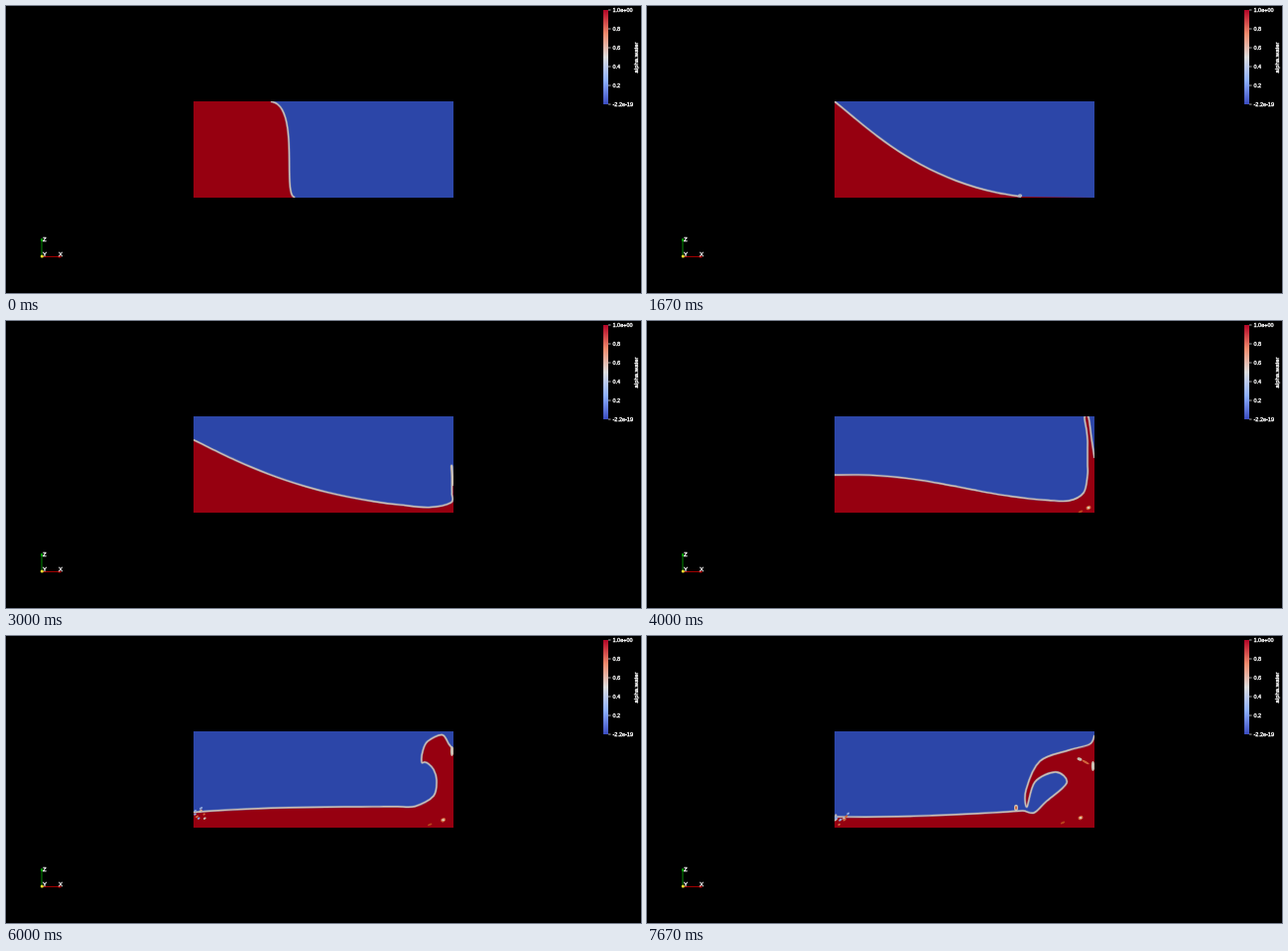
Recreate the animation shown at these times as an HTML page with a canvas. Size 640 by 289 pixels, loop 8000 ms.

```html
<!DOCTYPE html>
<html lang="en">
<head>
<meta charset="utf-8">
<title>Dam break, alpha.water</title>
<style>
html, body { margin: 0; width: 100%; height: 100%; overflow: hidden; background: #000; }
canvas { display: block; }
</style>
</head>
<body>
<canvas id="stage" width="640" height="289"></canvas>
<script>
const ctx = document.getElementById('stage').getContext('2d');
const LOOP = 8000;
const LEFT = 189, TOP = 96, RIGHT = 451, BOTTOM = 193;
const RED = '#960010', BLUE = '#2c46a8';
const PALE = '#cbbfb2', SKY = '#8fa9df', ORANGE = '#d0653c';

const parse = ([step, text]) => ({ step, points: text.split(' ').map(p => p.split(',').map(Number)) });

// One cubic Bezier for the main water surface, keyed by step
const floorKeys = [
  [0, '267,96 297,100 278,190 291,193'],
  [5, '189,96 225,125 280,180 377,192'],
  [7, '189,96 210,142 285,179 427,192'],
  [12, '189,155 290,152 340,181 425,181'],
  [16, '189,177 270,160 340,172 420,173'],
  [20, '189,178 270,182 340,173 405,170'],
  [23, '189,182 250,183 320,180 379,176']
].map(parse);

// Outline of the jet at the right wall, which curls into a breaker
const jetKeys = [
  [12, '440,173 444,155 444,145 444,135 444,128 444,120 443,110 441,97 445,97 448,118 451,138'],
  [16, '436,163 437,145 435,135 433,126 433,120 434,114 435,105 437,98 443,97 447,113 451,132'],
  [20, '426,159 431,145 427,134 418,131 411,134 404,140 405,127 413,114 436,102 446,105 451,97'],
  [23, '390,178 402,167 423,148 412,137 391,147 383,172 382,155 396,126 425,115 446,109 451,100']
].map(parse);

const mix = (a, b, u) => a + (b - a) * u;

function pose(keys, step) {
  const next = keys.findIndex(k => k.step > step);
  const i = next < 0 ? keys.length - 2 : Math.max(0, next - 1);
  const a = keys[i], b = keys[i + 1];
  let u = Math.max(0, (step - a.step) / (b.step - a.step));
  if (a.step === 0) u **= 1.25; // the column starts slowly
  return a.points.map((p, j) => p.map((v, axis) => mix(v, b.points[j][axis], u)));
}

function surfaceAt(step) {
  const [a, b, c, d] = pose(floorKeys, step), points = [];
  for (let t = 0; t < 1.01; t += 1 / 12) {
    const s = 1 - t;
    points.push([0, 1].map(n => s * s * s * a[n] + 3 * s * s * t * b[n] + 3 * s * t * t * c[n] + t * t * t * d[n]));
  }
  if (step < 8) return points;
  // The jet shoots up along the wall, then leans away from it
  const rise = Math.min(1, (step - 7.8) / 2.5);
  const jet = pose(jetKeys, step).map(([x, y]) => [mix(RIGHT, x, rise * rise), mix(192, y, rise)]);
  return points.concat(jet);
}

// Smooth curve through the points
function spline(points) {
  const last = points.length - 1, path = new Path2D();
  path.moveTo(...points[0]);
  for (let i = 0; i < last; i++) {
    const a = points[i], b = points[i + 1];
    const p = points[Math.max(0, i - 1)], q = points[Math.min(last, i + 2)];
    path.bezierCurveTo(
      a[0] + (b[0] - p[0]) / 6, a[1] + (b[1] - p[1]) / 6,
      b[0] - (q[0] - a[0]) / 6, b[1] - (q[1] - a[1]) / 6, b[0], b[1]);
  }
  return path;
}

function edge(path) {
  ctx.lineJoin = 'round';
  for (const [width, color] of [[2.6, 'rgba(125,145,200,.45)'], [1.4, PALE]]) {
    ctx.lineWidth = width;
    ctx.strokeStyle = color;
    ctx.stroke(path);
  }
}

function blob(x, y, rx, ry, color, turn = 0) {
  ctx.fillStyle = color;
  ctx.beginPath();
  ctx.ellipse(x, y, rx, ry, turn, 0, 7);
  ctx.fill();
}

const random = n => {
  const v = Math.sin(n * 127.1 + 3.7) * 43758.5453;
  return v - Math.floor(v);
};

// Loose drops scattered in a box
function spray(seed, count, x, y, w, h) {
  for (let i = 0; i < count; i++) {
    const n = seed * 50 + i;
    blob(x + w * random(n), y + h * random(n + .3), 1 + random(n + .6), 1, [SKY, PALE, ORANGE][i % 3], -.6);
  }
}

function details(step, surface) {
  if (step > 1 && step < 8) { // leading edge
    const [x, y] = surface[surface.length - 1];
    blob(x - 1, y - 1, 2.2, 1.7, '#a9b3c4');
  }
  if (step > 10) { // air trapped in the right corner
    const u = (step - 12) / 11, x = 445 - 8 * u, y = 188 - 5 * u;
    blob(x, y, 2.6, 2, ORANGE, -.5);
    blob(x, y, 1.4, 1.1, '#dccdb8');
    blob(437 - 18 * u, 192 - 4 * u, 2.4, 1, '#b8431c', -.4);
  }
  if (step > 13 && step < 18) { // plunge at the left wall
    blob(195.5, 180, 1.3, 5, PALE, -.1);
    blob(192, 172, 1.2, 4, SKY, -.5);
  }
  if (step > 17) {
    spray(step, 10, 189, 155 + step, 14, 12);
    blob(449.5, 116 + (step - 18) * 3, 1.6, 5, PALE);
  }
  if (step > 22) { // splash of the breaker
    blob(372, 173, 2, 3.2, PALE);
    blob(372, 173, 1, 1.8, ORANGE);
    blob(436, 124, 2.6, 1.5, PALE, .3);
    blob(442, 127, 4, 1, ORANGE, .5);
  }
}

function tank(step) {
  const surface = surfaceAt(step), line = spline(surface);
  const water = new Path2D(line);
  water.lineTo(RIGHT, BOTTOM);
  water.lineTo(LEFT, BOTTOM);
  water.lineTo(LEFT, surface[0][1]);
  ctx.save();
  ctx.beginPath();
  ctx.rect(LEFT, TOP, RIGHT - LEFT, BOTTOM - TOP);
  ctx.clip();
  ctx.fillStyle = BLUE;
  ctx.fillRect(LEFT, TOP, RIGHT - LEFT, BOTTOM - TOP);
  ctx.fillStyle = RED;
  ctx.fill(water);
  edge(line);
  details(step, surface);
  ctx.restore();
}

function label(text, x, y, size) {
  ctx.font = `${size}px "Liberation Sans", Arial, sans-serif`;
  ctx.fillStyle = ctx.strokeStyle = '#fff';
  ctx.lineWidth = .35;
  ctx.fillText(text, x, y);
  ctx.strokeText(text, x, y);
}

function legend() {
  const ramp = ctx.createLinearGradient(0, 4, 0, 99);
  ['#b40426', '#f08a6c', '#dddddd', '#8db0fe', '#3b4cc0'].forEach((c, i) => ramp.addColorStop(i / 4, c));
  ctx.fillStyle = ramp;
  ctx.fillRect(602, 4, 5, 95);
  ctx.textBaseline = 'middle';
  ['1.0e+00', '0.8', '0.6', '0.4', '0.2', '-2.2e-19'].forEach((text, i) => {
    const y = 4 + 19 * i;
    ctx.fillStyle = '#aaa';
    ctx.fillRect(607, y - .5, 2.5, 1);
    label(text, 611.5, y, 5.5);
  });
  ctx.save();
  ctx.translate(635, 67.5);
  ctx.rotate(-Math.PI / 2);
  label('alpha.water', 0, 0, 6);
  ctx.restore();
}

function axes() {
  ctx.fillStyle = '#008a00';
  ctx.fillRect(35.5, 235, 1, 17);
  ctx.fillStyle = '#a00000';
  ctx.fillRect(36, 252, 18, 1);
  blob(36, 235.5, 1, 1.8, '#00b000');
  blob(54, 252.5, 1.8, 1, '#c00000');
  blob(36.3, 252, 1.6, 1.6, '#f0e030');
  label('Z', 37, 235, 6);
  label('Y', 37, 250.5, 6);
  label('X', 53, 250.5, 6);
}

function draw(now) {
  // Three steps per second, on a 10 ms clock
  const step = Math.floor((Math.floor(now % LOOP / 10) + .5) * 3 / 100);
  ctx.fillStyle = '#000';
  ctx.fillRect(0, 0, 640, 289);
  tank(step);
  legend();
  axes();
  requestAnimationFrame(draw);
}
draw(0);
</script>
</body>
</html>
```
